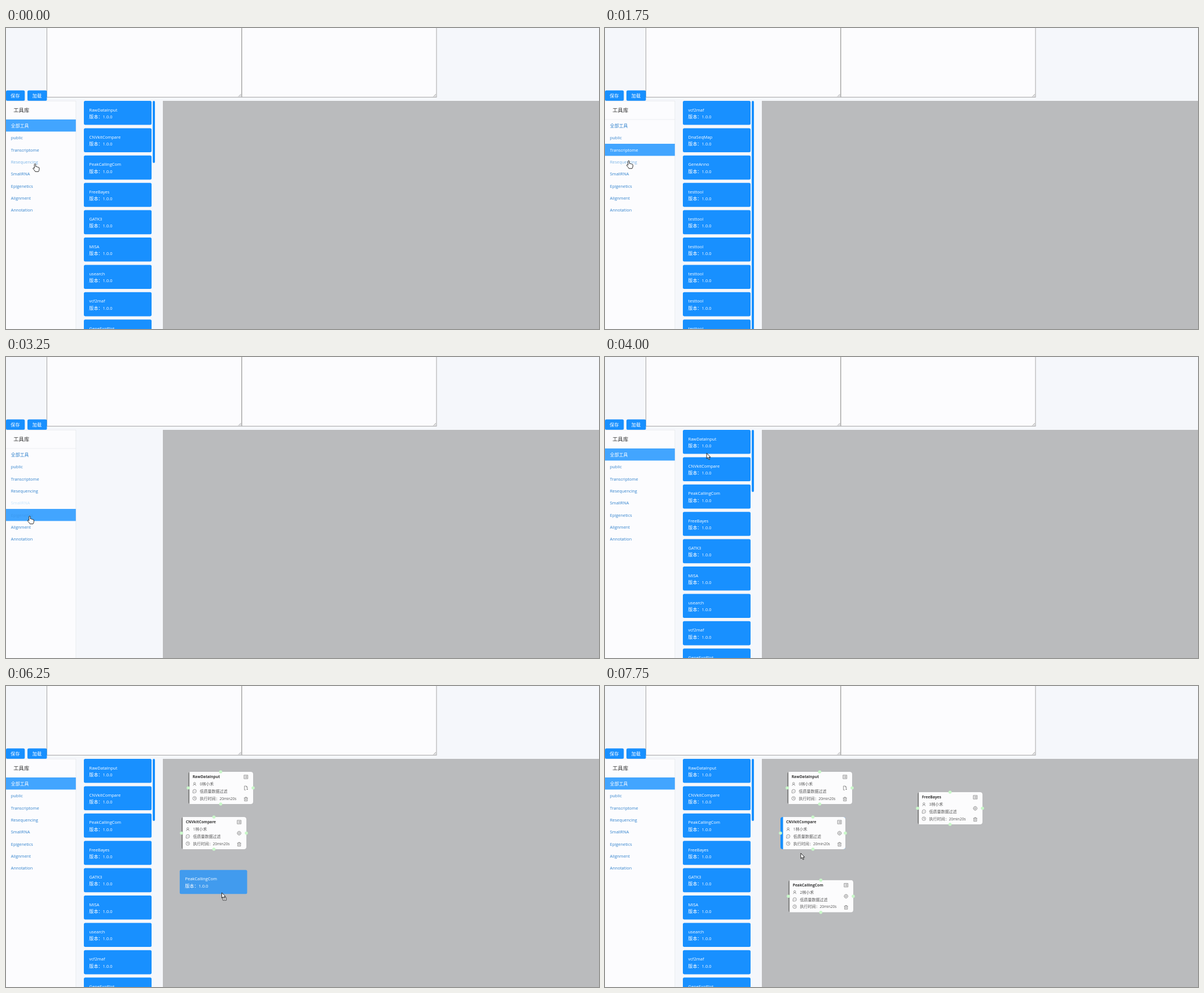
These frames come from a looping animation (1051 by 533 pixels, 8000 ms). An HTML page:

```html
<!DOCTYPE html>
<html lang="zh-CN">
<head>
<meta charset="utf-8">
<title>工具库</title>
<style>
html, body { margin: 0; width: 100%; height: 100%; overflow: hidden; background: #f5f7fb; }
svg { display: block; width: 1051px; height: 533px; }
text { font-family: "Open Sans", "Noto Sans CJK SC", "Noto Sans CJK", sans-serif; white-space: pre; }
</style>
</head>
<body>
<svg viewBox="0 0 1051 533" xmlns="http://www.w3.org/2000/svg">
  <g id="page"></g>
  <g id="scene"></g>
</svg>
<script>
const STEP = 250, STEPS = 32;
const BLUE = '#1890ff', ACTIVE = '#42a5ff', LINK = '#2f80cc', HOVER = '#7ab4e6', FADED = '#c8e5fc';

const MENU = ['全部工具', 'public', 'Transcriptome', 'Resequencing', 'SmallRNA', 'Epigenetics', 'Alignment', 'Annotation'];
const repeat = (name, n) => Array(n).fill(name);
const LISTS = [
  ['RawDataInput', 'CNVkitCompare', 'PeakCallingCom', 'FreeBayes', 'GATK3', 'MISA', 'usearch', 'vcf2maf', 'GeneExpPlot'],
  ['RawDataInput', 'FreeBayes', 'SamToFastQ', 'ReadsDisPlot', ...repeat('testtool', 2)],
  ['vcf2maf', 'DnaSeqMap', 'GeneAnno', ...repeat('testtool', 6)],
  ['FreeBayes', 'GATK3', 'testtool'],
  ['testtool'],
  ['PeakCallingCom']
];

const rowY = i => 162 + i * 21.35;
const cardY = i => 129 + i * 48.4;

// The pointer clicks menu rows, then drags the first cards onto the canvas
const CLICKS = [
  { step: 2, row: 1 }, { step: 6, row: 2 }, { step: 8, row: 3 },
  { step: 10, row: 4 }, { step: 13, row: 5 }, { step: 15, row: 0 }
];
const NODES = [
  { grab: 17, drop: 19, x: 323, y: 152 },
  { grab: 20, drop: 22, x: 311, y: 232, picked: 31 },
  { grab: 23, drop: 26, x: 325, y: 343.7 },
  { grab: 27, drop: 29, x: 554, y: 188, picked: 30 }
];
const GRIP = { x: 74.5, y: 40.2 };    // pointer inside a dragged card
const LANDING = { x: 4, y: 10.3 };    // a node lands this far from its card

const ROUTE = [
  { step: 0, x: 51.5, y: 240.5 },
  ...CLICKS.map(({ step, row }) => ({ step, x: 42, y: rowY(row) + 13 })),
  ...NODES.flatMap(({ grab, drop, x, y }, i) => [
    { step: grab, x: 138 + GRIP.x, y: cardY(i) + GRIP.y },
    { step: drop, x: x - LANDING.x + GRIP.x, y: y - LANDING.y + GRIP.y }
  ]),
  { step: STEPS - 1, x: 347, y: 296 }
];

const easeOut = u => 1 - (1 - u) ** 2.4;

function pointerAt(step) {
  const next = ROUTE.findIndex(p => p.step >= step);
  const to = ROUTE[next], from = ROUTE[Math.max(0, next - 1)];
  const u = easeOut((step - from.step) / (to.step - from.step || 1));
  return { x: from.x + (to.x - from.x) * u, y: from.y + (to.y - from.y) * u };
}

const rect = (x, y, w, h, fill, r = 0, more = '') =>
  `<rect x="${x}" y="${y}" width="${w}" height="${h}" rx="${r}" fill="${fill}" ${more}/>`;
const line = (d, color, width = 1) => `<path d="${d}" fill="none" stroke="${color}" stroke-width="${width}"/>`;
const at = (x, y, body) => `<g transform="translate(${x} ${y})">${body}</g>`;

// Latin runs are set slightly smaller than the CJK runs beside them
function text(x, y, string, size, fill, weight = 400) {
  const runs = string.replace(/[\x20-\x7e]+/g, s => `<tspan font-size="${size * 0.932}">${s}</tspan>`);
  return `<text x="${x}" y="${y}" font-size="${size}" fill="${fill}" font-weight="${weight}">${runs}</text>`;
}

function page() {
  const area = x => rect(x, -5, 345, 127.5, '#fcfcfe', 0, 'stroke="#a5a5a5"') +
    line(`M${x + 339.5} 121.5l4.5-4.5M${x + 342} 121.5l2-2`, '#777', 0.7);
  const button = (x, w, label) => rect(x, 110.5, w, 18.5, BLUE, 2.5) +
    text(x + w / 2 - 8.4, 123, label, 8.15, '#fff', 500);
  return rect(0, 0, 1051, 533, '#f5f7fb') + area(72.5) + area(418) +
    button(0, 33.3, '保存') + button(38, 34.5, '加载') +
    rect(0, 129, 124, 404, '#fcfcfe') +
    line('M0 129.3H124M123.8 129V533M0 162H124', '#e6e9ed', 0.8) +
    text(13.3, 149.4, '工具库', 9.3, '#333') +
    rect(278, 129, 773, 404, '#babbbd');
}

function card(x, y, w, name, opacity = 1) {
  return at(x, y, rect(0, 0, w, 42.6, BLUE, 2.5, `opacity="${opacity}"`) +
    text(9.5, 18.5, name, 8.1, '#fff', 500) + text(9.3, 30.9, '版本：1.0.0', 8.1, '#fff', 500));
}

function menu(active, previous, switching, hovered) {
  return MENU.map((label, i) => {
    let color = i === hovered ? HOVER : LINK;
    if (i === active) color = switching ? '#3b9af0' : '#fff';
    else if (switching && i === previous) color = FADED;
    return (i === active ? rect(0, Math.round(rowY(i)), 123.8, 21.4, ACTIVE) : '') +
      text(8.8, rowY(i) + 13.8, label, 7.95, color);
  }).join('');
}

function toolList(index) {
  const names = LISTS[index], long = names.length > 8;
  const cards = names.map((name, i) => card(138, cardY(i), long ? 120 : 123.5, name)).join('');
  return cards + (long ? rect(260, 129, 4, index ? 420 : 110, BLUE, 2) : '');
}

const ICONS = {
  user: '<circle cy="-1.2" r="1.7"/><path d="M-2.5 3Q-2.2.5 0 .5T2.5 3"/>',
  chat: '<path d="M-3 3V0A3.1 3.1 0 1 1 0 3ZM-1.6 0h.7M-.3 0h.7M1 0h.7"/>',
  clock: '<circle r="3.2"/><path d="M0-2V.2H1.7"/>',
  list: '<path d="M-3.4-3.2H3.4V3.2H-3.4ZM-2-1.5h.8M-.4-1.5H2.2M-2 0h.8M-.4 0H2.2M-2 1.5h.8M-.4 1.5H2.2"/>',
  file: '<path d="M0 3.5H-2.7V-3.5H.7L2.7-1.5V.2M.7-3.5V-1.5H2.7M1 2H3.8M2.4.7V3.4"/>',
  gear: '<circle r="3.2"/><circle r="1.2"/><path d="M0-3.8V-3M0 3V3.8M-3.8 0H-3M3 0H3.8"/>',
  trash: '<path d="M-3.5-2H3.5M-1.2-2V-3.3H1.2V-2M-2.6-2V3.4H2.6V-2M-.8-.4V2M.8-.4V2"/>'
};
const icon = (name, x, y) =>
  `<g transform="translate(${x} ${y})" fill="none" stroke="#666" stroke-width=".65">${ICONS[name]}</g>`;

function node({ x, y }, i, picked) {
  const w = 115, h = 57, shift = picked ? 2.4 : 0, bar = picked ? 4.6 : 2.2;
  const rows = [['user', `${i}林小禾`], ['chat', '低质量数据过滤'], ['clock', '执行时间：20min20s']];
  const tools = ['list', i ? 'gear' : 'file', 'trash'];
  const dots = [[w / 2, 0], [0, h / 2], [w, h / 2], [w / 2, h]];
  return at(x, y,
    rect(0, 0, w, h, picked ? BLUE : '#858585', 4) +
    `<path d="M${bar} 0H111Q115 0 115 4V53Q115 57 111 57H${bar}Z" fill="#fcfcfd"/>` +
    at(shift, 0,
      text(7.7, 11.1, LISTS[0][i], 7.2, '#333', 700) +
      rows.map(([name, label], r) => icon(name, 11.2, 21.6 + r * 12.7) +
        text(20.4, 24.3 + r * 12.7, label, 7.03, '#555')).join('') +
      tools.map((name, r) => icon(name, 102.2, 9 + r * 19.6)).join('')) +
    dots.map(([cx, cy]) => `<circle cx="${cx}" cy="${cy}" r="2.8" fill="#c9f7c9"/>`).join(''));
}

function pointer(x, y, hand, dragging) {
  const shape = hand
    ? 'M-1.2 8V1.2Q-1.2 0 0 0T1.2 1.2V5Q3 4.3 3.4 5.6Q5 5 5.5 6.3Q7.2 5.8 7.4 7.3V10Q7.2 12 6 13.8H.4Q-.6 11.8-3.6 8.6Q-3.6 6.8-2.2 7.2Z'
    : 'M0 0V9.6L2.2 7.6 3.9 11.4 5.5 10.7 3.9 7.1H6.8Z';
  return at(x, y, `<path d="${shape}" fill="#fff" stroke="#111" stroke-width=".9"/>` +
    (dragging ? rect(1.8, 8.7, 6.4, 5, '#ddd', 0.6, 'stroke="#333" stroke-width=".8"') +
      line('M3.4 11.2H6.6', '#333', 0.7) : ''));
}

function scene(step) {
  const { x, y } = pointerAt(step);
  const [current, before] = CLICKS.filter(c => c.step <= step).reverse();
  const active = current?.row ?? 0, previous = before?.row ?? 0;
  const switching = current?.step === step;   // the list is empty while it reloads
  const overMenu = x < 124;
  const hovered = overMenu ? Math.floor((y - rowY(0)) / 21.35) : -1;
  const dragged = NODES.findIndex(n => step > n.grab && step < n.drop);
  const dragging = dragged >= 0;
  return menu(active, previous, switching, hovered) +
    (switching ? '' : toolList(active)) +
    NODES.map((n, i) => step >= n.drop ? node(n, i, step === n.picked) : '').join('') +
    (dragging ? card(x - GRIP.x, y - GRIP.y, 119.5, LISTS[0][dragged], 0.75) : '') +
    pointer(x, y, overMenu, dragging);
}

const sceneLayer = document.getElementById('scene');
document.getElementById('page').innerHTML = page();
let start, shown = -1;

function frame(now) {
  start ??= now;
  const step = Math.floor((now - start) / STEP) % STEPS;
  if (step !== shown) sceneLayer.innerHTML = scene(shown = step);
  requestAnimationFrame(frame);
}
sceneLayer.innerHTML = scene(0);
requestAnimationFrame(frame);
</script>
</body>
</html>
```
